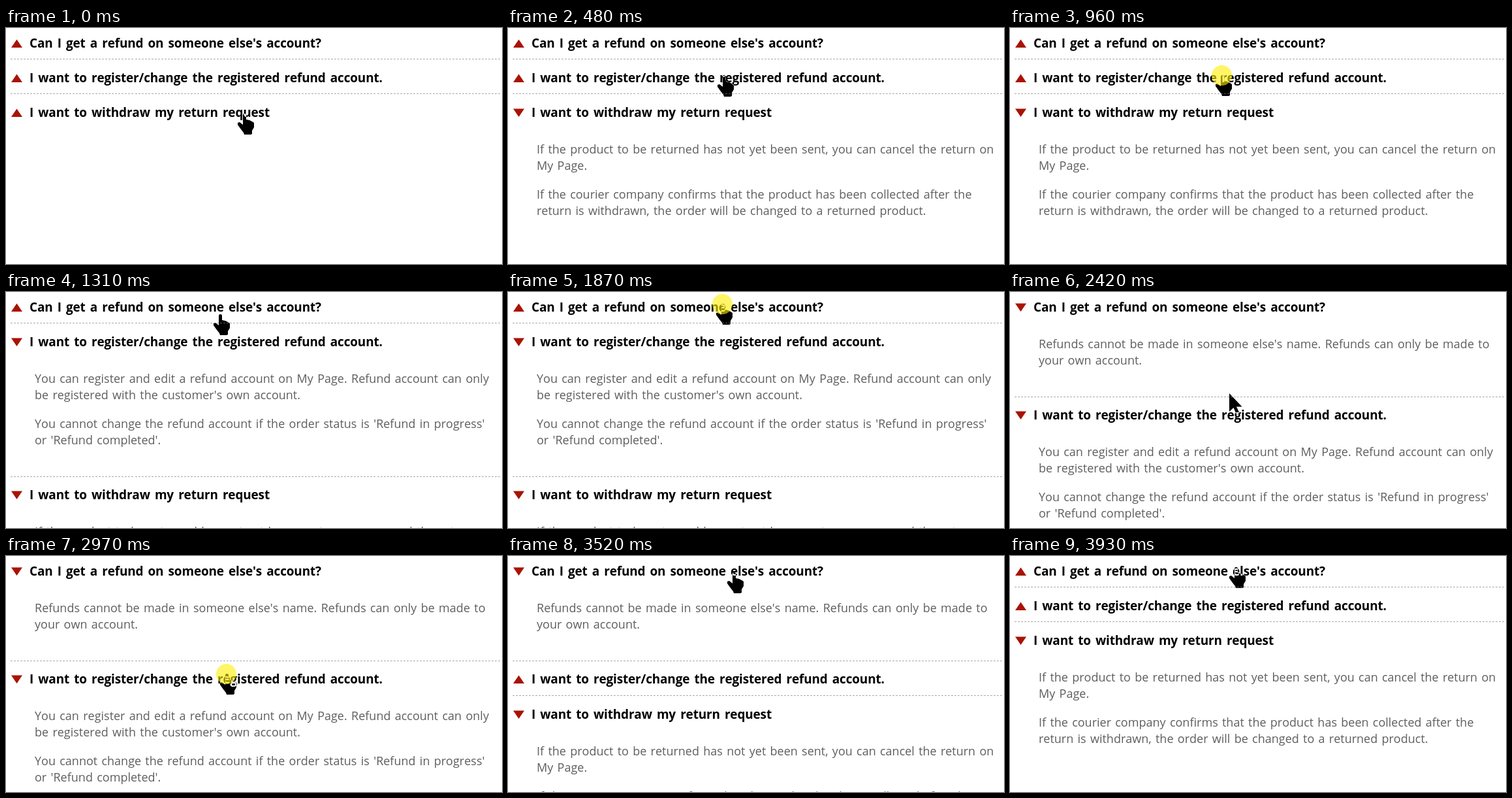
An HTML page for the animation above (4000 ms loop, 760 px wide and 361 px high).

```html
<!DOCTYPE html>
<html lang="en">
<head>
<meta charset="utf-8">
<title>Refund questions</title>
<style>
  html, body { margin: 0; width: 100%; height: 100%; overflow: hidden; background: #fff; }
  svg { display: block; }
  text { font-family: "Open Sans", "Noto Sans", sans-serif; font-kerning: none; white-space: pre; }
  .head { font-size: 19px; font-weight: 700; letter-spacing: -.18px; word-spacing: 2.4px; fill: #000; }
  .body { font-size: 18px; word-spacing: 1.6px; fill: #5e5e5e; }
  .mark { fill: #a81304; }
  .rule { stroke: #aaa; stroke-dasharray: 3 2.0134; shape-rendering: crispEdges; }
  /* the pointer inverts whatever lies under it */
  #pointer { fill: #fff; mix-blend-mode: difference; }
</style>
</head>
<body>
<svg width="760" height="361" viewBox="0 0 760 361">
  <rect width="760" height="361" fill="#fff"/>
  <g id="list"></g>
  <path id="pointer"/>
  <circle id="click" r="15.5" fill="#fe0" opacity=".6"/>
</svg>
<script>
const LOOP = 4000;
const CLICK = 180;        // how long a click glows before the section toggles
const ROW = 53.15;        // height of a closed section
const PARAGRAPH = 68.8;   // two lines of text and the gap below
const LINE = 25;

const HAND = "M-1 2Q-1 0 1.5 0Q4 0 4 2V9L9 10L13 12L16 14V21L13 26V31L11 32H1L0 29L-4 24L-9 17V14L-6 13L-1 17Z";
const ARROW = "M0 0V28L6.5 22L11 32L15.5 30L11 20.5H19.5Z";
const UP = "M8 0H25L16.5 -12.5Z";
const DOWN = "M8 -12.5H25L16.5 0Z";

const sections = [
  {
    title: "Can I get a refund on someone else's account?",
    opens: 1940, closes: 3750,
    lines: ["Refunds cannot be made in someone else's name. Refunds can only be made to",
            "your own account."]
  },
  {
    title: "I want to register/change the registered refund account.",
    opens: 1140, closes: 3030,
    lines: ["You can register and edit a refund account on My Page. Refund account can only",
            "be registered with the customer's own account.",
            "You cannot change the refund account if the order status is 'Refund in progress'",
            "or 'Refund completed'."]
  },
  {
    title: "I want to withdraw my return request",
    opens: 250, closes: LOOP,
    lines: ["If the product to be returned has not yet been sent, you can cancel the return on",
            "My Page.",
            "If the courier company confirms that the product has been collected after the",
            "return is withdrawn, the order will be changed to a returned product."]
  }
];

const home = { x: 364, y: 131 };
const moves = [
  { from: 250, to: 560, x: 329, y: 72 },
  { from: 620, to: 760, x: 324, y: 72 },
  { from: 1140, to: 1660, x: 328, y: 18 },
  { from: 2170, to: 2710, x: 337, y: 180 },
  { from: 3030, to: 3800, x: 345, y: 17 }
];

const toggles = sections.flatMap(s => [s.opens, s.closes]).filter(t => t < LOOP);
const $ = id => document.getElementById(id);
const easeOut = k => 1 - (1 - k) ** 3;

function add(parent, tag, attrs, text) {
  const el = document.createElementNS("http://www.w3.org/2000/svg", tag);
  for (const name in attrs) el.setAttribute(name, attrs[name]);
  if (text) el.textContent = text;
  parent.appendChild(el);
  return el;
}

const place = (el, x, y) => el.setAttribute("transform", `translate(${x} ${y})`);
const show = (el, on) => el.setAttribute("visibility", on ? "visible" : "hidden");

sections.forEach((s, i) => {
  s.group = add($("list"), "g", {});
  s.mark = add(s.group, "path", { class: "mark" });
  add(s.group, "text", { class: "head", x: 36, y: 0 }, s.title);
  s.body = add(s.group, "g", {});
  s.lines.forEach((line, n) => {
    const y = Math.round(56 + Math.floor(n / 2) * PARAGRAPH + n % 2 * LINE);
    add(s.body, "text", { class: "body", x: 44, y }, line);
  });
  s.grow = 43.8 + s.lines.length / 2 * PARAGRAPH;
  if (i < sections.length - 1) s.rule = add($("list"), "path", { class: "rule", d: "M7 .5H757" });
});

function pointerAt(t) {
  let { x, y } = home;
  for (const m of moves) {
    const k = easeOut(Math.min(1, Math.max(0, (t - m.from) / (m.to - m.from))));
    x += (m.x - x) * k;
    y += (m.y - y) * k;
  }
  return [Math.round(x), Math.round(y)];
}

function draw(t) {
  const [x, y] = pointerAt(t);
  let top = 30.2;
  let overHead = false;

  for (const s of sections) {
    const open = t >= s.opens && t < s.closes;
    const base = Math.floor(top);
    place(s.group, 0, base);
    s.mark.setAttribute("d", open ? DOWN : UP);
    show(s.body, open);
    overHead = overHead || Math.abs(y - (base - 7)) < 12;
    top += ROW + (open ? s.grow : 0);
    if (s.rule) place(s.rule, 0, Math.round(top - 36.25));
  }

  $("pointer").setAttribute("d", overHead ? HAND : ARROW);
  place($("pointer"), x, y);
  place($("click"), x + .5, y + .5);
  show($("click"), toggles.some(at => t >= at - CLICK && t < at));
}

const start = performance.now();
function tick() {
  draw((performance.now() - start) % LOOP);
  requestAnimationFrame(tick);
}
tick();
</script>
</body>
</html>
```
